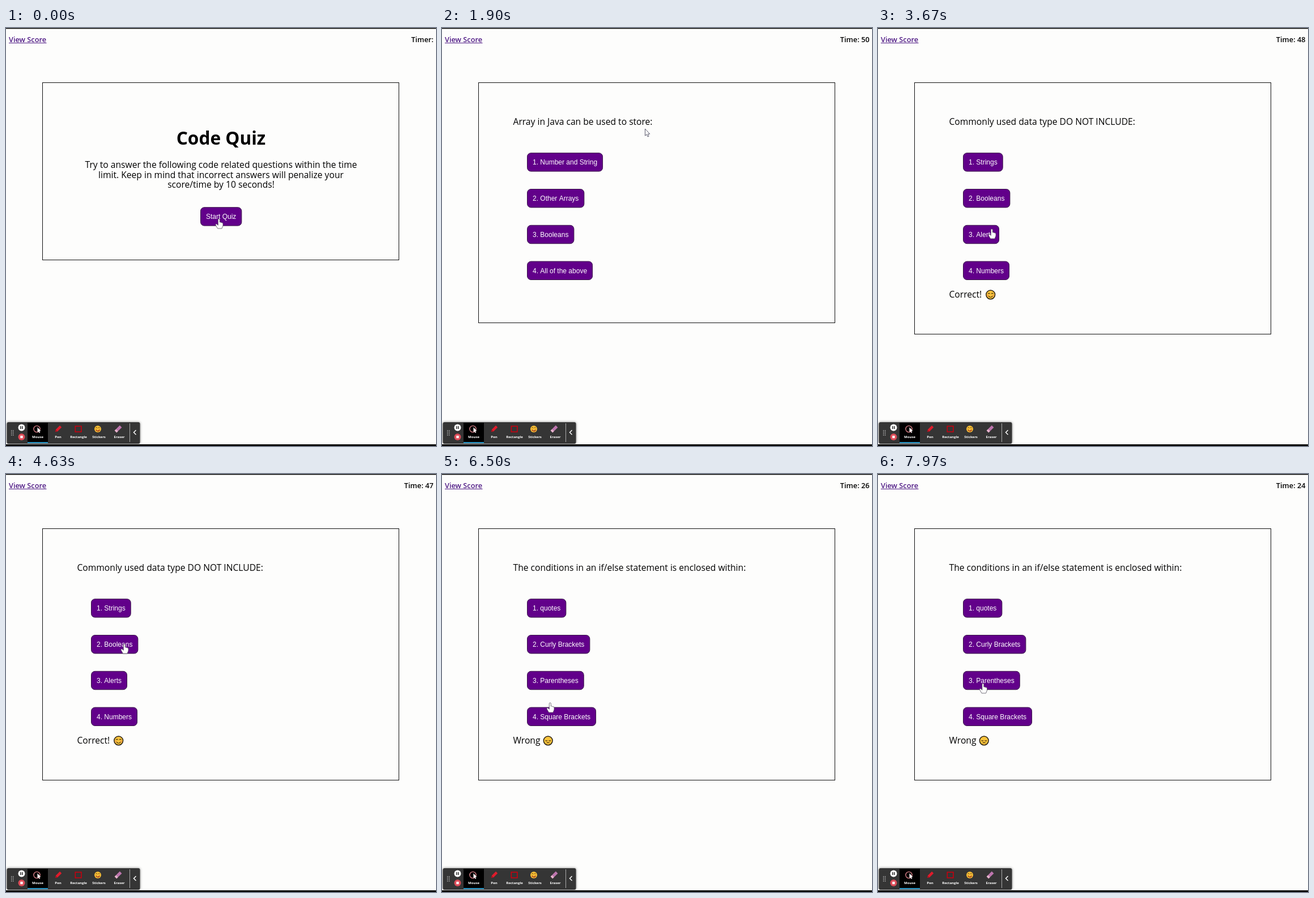
Animation of 759x738 px, one loop 8000 ms. Source, as an HTML page with a canvas:

```html
<!DOCTYPE html>
<html lang="en">
<head>
<meta charset="utf-8">
<title>Code Quiz</title>
<style>
  html, body { margin: 0; width: 100%; height: 100%; overflow: hidden; background: #fdfdfc; }
  canvas { display: block; }
</style>
</head>
<body>
<canvas id="stage" width="759" height="738"></canvas>
<script>
const ctx = document.getElementById('stage').getContext('2d');
const LOOP = 8000;
const SANS = '"Open Sans", "Noto Sans", sans-serif';
const BODY = `15.63px ${SANS}`;
const HEADER = `600 12.75px ${SANS}`;
const BUTTON = '12px "Liberation Sans", Arial, sans-serif';

const screens = [
  { from: 0, height: 314 },
  { from: 500, height: 425, question: 'Array in Java can be used to store:',
    answers: ['Number and String', 'Other Arrays', 'Booleans', 'All of the above'] },
  { from: 3060, height: 445, question: 'Commonly used data type DO NOT INCLUDE:',
    answers: ['Strings', 'Booleans', 'Alerts', 'Numbers'], result: 'Correct!', happy: true },
  { from: 4900, height: 445, question: 'The conditions in an if/else statement is enclosed within:',
    answers: ['quotes', 'Curly Brackets', 'Parentheses', 'Square Brackets'], result: 'Wrong' },
];
const intro = [
  'Try to answer the following code related questions within the time',
  'limit. Keep in mind that incorrect answers will penalize your',
  'score/time by 10 seconds!',
];

// Cursor stops: time, x, y
const cursorPath = [
  [0, 376, 337], [1050, 376, 337], [1700, 358.5, 178], [2050, 358.5, 178],
  [2850, 212, 426], [3200, 212, 426], [3670, 201, 355], [4350, 209, 300],
  [5500, 209, 300], [6500, 191, 404], [7000, 191, 404], [7970, 185.5, 370],
];
const clicks = [400, 2980, 4800];
const RING_TIME = 330;

const handShape = new Path2D('M-1.7 1.2C-1.7-.5 1.3-.5 1.3 1.2V6Q3-.2+5.2 3.5 6 3.6 6.8Q7 6.2 7 8.5V12L5 17H-2.5L-6 10.8C-6.5 9-4.5 8.2-3.4 9.8L-1.7 11.3Z'.replace('Q3-.2+5.2 3.5 6 3.6 6.8', 'Q3 5.2 3.6 6.6'));
const arrowShape = new Path2D('M0 0V12.2L2.7 9.8 4.7 14 6.6 13.1 4.8 9.1H8.3Z');

function text(str, x, y, font, color = '#000', align = 'left') {
  ctx.font = font;
  ctx.fillStyle = color;
  ctx.textAlign = align;
  ctx.fillText(str, x, y);
}

function rect(x, y, w, h, color) {
  ctx.fillStyle = color;
  ctx.fillRect(x, y, w, h);
}

function circle(x, y, r, fill, stroke, width = 1) {
  ctx.beginPath();
  ctx.arc(x, y, r, 0, Math.PI * 2);
  paint(fill, stroke, width);
}

function paint(fill, stroke, width) {
  if (fill) { ctx.fillStyle = fill; ctx.fill(); }
  if (stroke) { ctx.strokeStyle = stroke; ctx.lineWidth = width; ctx.stroke(); }
}

function line(points, color, width = 1) {
  ctx.beginPath();
  points.forEach(([x, y]) => ctx.lineTo(x, y));
  paint(null, color, width);
}

function arc(x, y, r, from, to, color, width = 1) {
  ctx.beginPath();
  ctx.arc(x, y, r, from * Math.PI, to * Math.PI);
  paint(null, color, width);
}

function placed(x, y, angle, draw) {
  ctx.save();
  ctx.translate(x, y);
  ctx.rotate(angle);
  draw();
  ctx.restore();
}

function button(label, x, y) {
  ctx.font = BUTTON;
  const w = ctx.measureText(label).width + 20, h = 33.4;
  ctx.beginPath();
  ctx.roundRect(x + .5, y + .5, w - 1, h - 1, 6.5);
  paint('#62008a', '#3a1648', 1);
  text(label, x + 10, y + 21.2, BUTTON, '#fff');
  return { x, y, w, h };
}

function face(x, y, happy) {
  circle(x, y, 7.9, '#f8c33c', '#2a2115', 1.5);
  const dark = '#4a3210';
  if (happy) {
    circle(x - 5, y + 1.4, 1.4, '#f09a4a');
    circle(x + 5, y + 1.4, 1.4, '#f09a4a');
  }
  for (const side of [-3, 3]) {
    if (happy) arc(x + side, y - .8, 1.7, 1.1, 1.9, dark, 1.2);
    else arc(x + side, y - 1.2, 1.7, .1, .9, dark, 1.2);
  }
  if (happy) arc(x, y + .8, 3.6, .12, .88, dark, 1.2);
  else arc(x, y + 5.6, 2.5, 1.15, 1.85, dark, 1.2);
}

function header(t) {
  rect(0, 0, 759, 1.4, '#000');
  rect(0, 735, 759, 3, '#0a0a0a');
  text('View Score', 5, 25, HEADER, '#4f1a85');
  rect(5, 26, 66.5, 1, '#4f1a85');
  const ticks = Math.floor((t - 1550) / 1000);
  const left = 50 - ticks - (ticks >= 4 ? 20 : 0);
  text(ticks < 0 ? 'Timer:' : `Time: ${left}`, 754.5, 25, HEADER, '#000', 'right');
}

// Draws the current card and returns its button areas.
function card({ height, question, answers, result, happy }) {
  ctx.strokeStyle = '#111';
  ctx.lineWidth = 1;
  ctx.strokeRect(64.5, 96.5, 629, height - 1);
  if (!question) {
    text('Code Quiz', 379.5, 206, `700 31.6px ${SANS}`, '#000', 'center');
    intro.forEach((str, i) => text(str, 379.5, 247 + i * 17.6, BODY, '#000', 'center'));
    return [button('Start Quiz', 343, 316.2)];
  }
  text(question, 125.5, 171.3, BODY);
  if (result) {
    text(result, 125.5, 476, BODY);
    face(happy ? 198.7 : 187.2, 470.8, happy);
  }
  return answers.map((answer, i) => button(`${i + 1}. ${answer}`, 150, 220.2 + i * 63.8));
}

function toolbar() {
  ctx.save();
  ctx.shadowColor = 'rgba(0,0,0,.5)';
  ctx.shadowBlur = 4;
  ctx.beginPath();
  ctx.roundRect(1.5, 696, 235, 38, 3);
  paint('#353535');
  ctx.restore();

  for (let i = 0; i < 8; i++) rect(9 + (i % 2) * 3, 710 + (i >> 1) * 2.7, 1.4, 1.4, '#bbb');
  circle(27.5, 705.5, 6, '#fff');
  rect(25.2, 703, 1.6, 5, '#333');
  rect(28.2, 703, 1.6, 5, '#333');
  circle(27.5, 722, 6, '#dc4c58');
  rect(25.3, 719.8, 4.4, 4.4, '#fff');

  rect(38, 697, 36, 36, '#000');
  rect(38, 731, 36, 2, '#2d9fd0');
  circle(54.5, 708, 5.6, null, '#d98088', 1.4);
  placed(55.5, 705, 0, () => {
    ctx.scale(.72, .72);
    ctx.fillStyle = '#fff';
    ctx.fill(arrowShape);
  });
  placed(92, 708, -Math.PI / 4, () => {
    rect(-4, -2.2, 10.5, 4.4, '#e01b2b');
    ctx.beginPath();
    ctx.moveTo(-4, -2.2);
    ctx.lineTo(-7.5, 0);
    ctx.lineTo(-4, 2.2);
    paint('#b01220');
  });
  ctx.strokeStyle = '#c8000f';
  ctx.lineWidth = 1.6;
  ctx.strokeRect(122.3, 703, 10.6, 10);
  circle(162, 708, 6, '#f5bd35');
  arc(159.8, 706.8, 1.4, 1.1, 1.9, '#5a3510');
  arc(164.2, 706.8, 1.4, 1.1, 1.9, '#5a3510');
  arc(162, 708.6, 3, .05, .95, '#a33a20', 1.6);
  placed(198, 708, -Math.PI / 4, () => {
    rect(-6.5, -2.6, 4, 5.2, '#e9b3cf');
    rect(-2.5, -2.6, 9, 5.2, '#bd75ae');
  });
  ['Mouse', 'Pen', 'Rectangle', 'Stickers', 'Eraser'].forEach((label, i) =>
    text(label, 56 + i * 36, 724, `700 6px ${SANS}`, '#fff', 'center'));
  rect(218, 698, 1, 33, '#aaa');
  line([[229.5, 710], [225.5, 714], [229.5, 718]], '#fff', 1.5);
}

function cursorAt(t) {
  const next = cursorPath.findIndex(stop => stop[0] > t);
  if (next < 0) return cursorPath.at(-1).slice(1);
  const [t0, x0, y0] = cursorPath[next - 1], [t1, x1, y1] = cursorPath[next];
  const p = (t - t0) / (t1 - t0), ease = p * p * (3 - 2 * p);
  return [x0 + (x1 - x0) * ease, y0 + (y1 - y0) * ease];
}

function cursor(t, buttons) {
  const [x, y] = cursorAt(t);
  const click = clicks.find(c => t >= c && t < c + RING_TIME);
  if (click !== undefined) circle(x, y, 20 * Math.min(1, .4 + (t - click) / 200), null, '#ec8488', 2);
  const margin = 8;
  const over = buttons.some(b => x > b.x - margin && x < b.x + b.w + margin &&
    y > b.y - margin && y < b.y + b.h + margin);
  placed(x, y, 0, () => {
    const shape = over ? handShape : arrowShape;
    ctx.fillStyle = '#fff';
    ctx.fill(shape);
    ctx.strokeStyle = over ? '#55505c' : '#33334a';
    ctx.lineWidth = .8;
    ctx.stroke(shape);
  });
}

function frame() {
  const t = performance.now() % LOOP;
  rect(0, 0, 759, 738, '#fdfdfc');
  header(t);
  const buttons = card(screens.findLast(screen => t >= screen.from));
  toolbar();
  cursor(t, buttons);
  requestAnimationFrame(frame);
}
frame();
</script>
</body>
</html>
```
